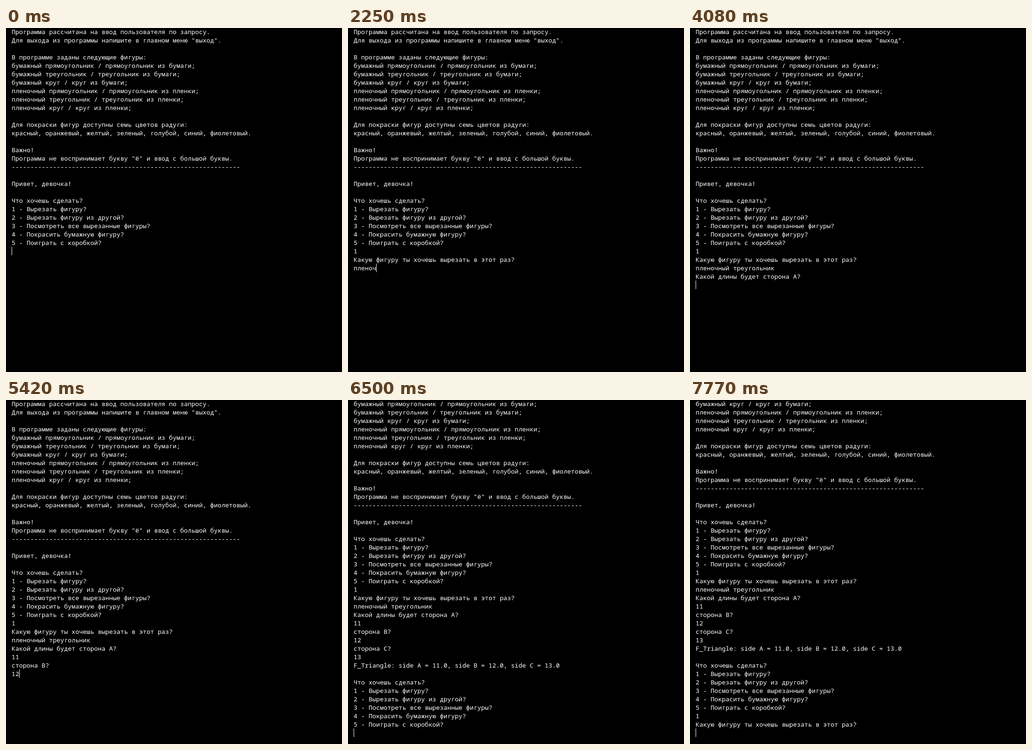
These frames come from a looping animation (717x734 px, 8 s). An HTML page:

```html
<!DOCTYPE html>
<html lang="ru">
<head>
<meta charset="utf-8">
<style>
  html, body { margin: 0; width: 100%; height: 100%; overflow: hidden; background: #000; }
  #screen { position: absolute; left: 12px; top: -1px; }
  #log {
    margin: 0; color: #fff; white-space: pre;
    font: calc(40px / 3)/18px "Noto Sans Mono", "DejaVu Sans Mono", monospace;
  }
  #caret { position: absolute; width: 1px; height: 18px; background: #fff; }
</style>
</head>
<body>
<div id="screen"><pre id="log"></pre><div id="caret"></div></div>
<script>
const LOOP = 8000, ROW = 18, COL = 8, LAST_ROW = 39;

const menu = `Что хочешь сделать?
1 - Вырезать фигуру?
2 - Вырезать фигуру из другой?
3 - Посмотреть все вырезанные фигуры?
4 - Покрасить бумажную фигуру?
5 - Поиграть с коробкой?
`;
const intro = `Программа рассчитана на ввод пользователя по запросу.
Для выхода из программы напишите в главном меню "выход".

В программе заданы следующие фигуры:
бумажный прямоугольник / прямоугольник из бумаги;
бумажный треугольник / треугольник из бумаги;
бумажный круг / круг из бумаги;
пленочный прямоугольник / прямоугольник из пленки;
пленочный треугольник / треугольник из пленки;
пленочный круг / круг из пленки;

Для покраски фигур доступны семь цветов радуги:
красный, оранжевый, желтый, зеленый, голубой, синий, фиолетовый.

Важно!
Программа не воспринимает букву "ё" и ввод с большой буквы.
${"-".repeat(61)}

Привет, девочка!

${menu}`;
const question = "Какую фигуру ты хочешь вырезать в этот раз?\n";

const events = [];
// caret: "end" follows the text, "home" is the line start, "off" is hidden
const add = (time, text, caret = "end") => events.push({ time, text, caret });
const blink = (time, caret) => add(time, "", caret);
const type = (text, from, to = from) => [...text].forEach((char, i) =>
  add(from + (to - from) * i / Math.max(1, text.length - 1), char));

add(0, intro);
blink(330, "off");
type("1", 540);
add(920, "\n" + question);
blink(1330, "off");
type("п", 1460);
type("ле", 1650, 1730);
type("ночны", 2030, 2410);
type("й ", 2560, 2650);
type("тре", 2820, 2980);
type("уголь", 3070, 3480);
type("ник", 3630, 3730);
add(4080, "\nКакой длины будет сторона A?\n");
blink(4490, "off");
type("11", 4560, 4640);
add(5030, "\n");
add(5050, "сторона B?\n");
type("12", 5310, 5420);
add(5720, "\n");
add(5740, "сторона C?\n");
type("13", 6060, 6140);
add(6480, "\n");
add(6500, "F_Triangle: side A = 11.0, side B = 12.0, side C = 13.0\n\n" + menu);
blink(6900, "off");
blink(7300, "end");
type("1", 7560);
blink(7730, "home");
add(7770, "\n" + question);

const screenBox = document.getElementById("screen");
const log = document.getElementById("log");
const caretBox = document.getElementById("caret");
let shown = 0;

function render(time) {
  const past = events.filter(e => e.time <= time + 0.01);
  if (past.length === shown) return;
  shown = past.length;

  const text = past.map(e => e.text).join("");
  const { caret } = past[shown - 1];
  const lines = text.split("\n");
  const row = lines.length - 1;

  log.textContent = text;
  screenBox.style.top = -1 - ROW * Math.max(0, row - LAST_ROW) + "px";
  caretBox.style.top = row * ROW + "px";
  caretBox.style.left = (caret === "home" ? 0 : lines[row].length * COL) + "px";
  caretBox.hidden = caret === "off";
}

const start = performance.now();
function tick() {
  render((performance.now() - start) % LOOP);
  requestAnimationFrame(tick);
}
tick();
</script>
</body>
</html>
```
